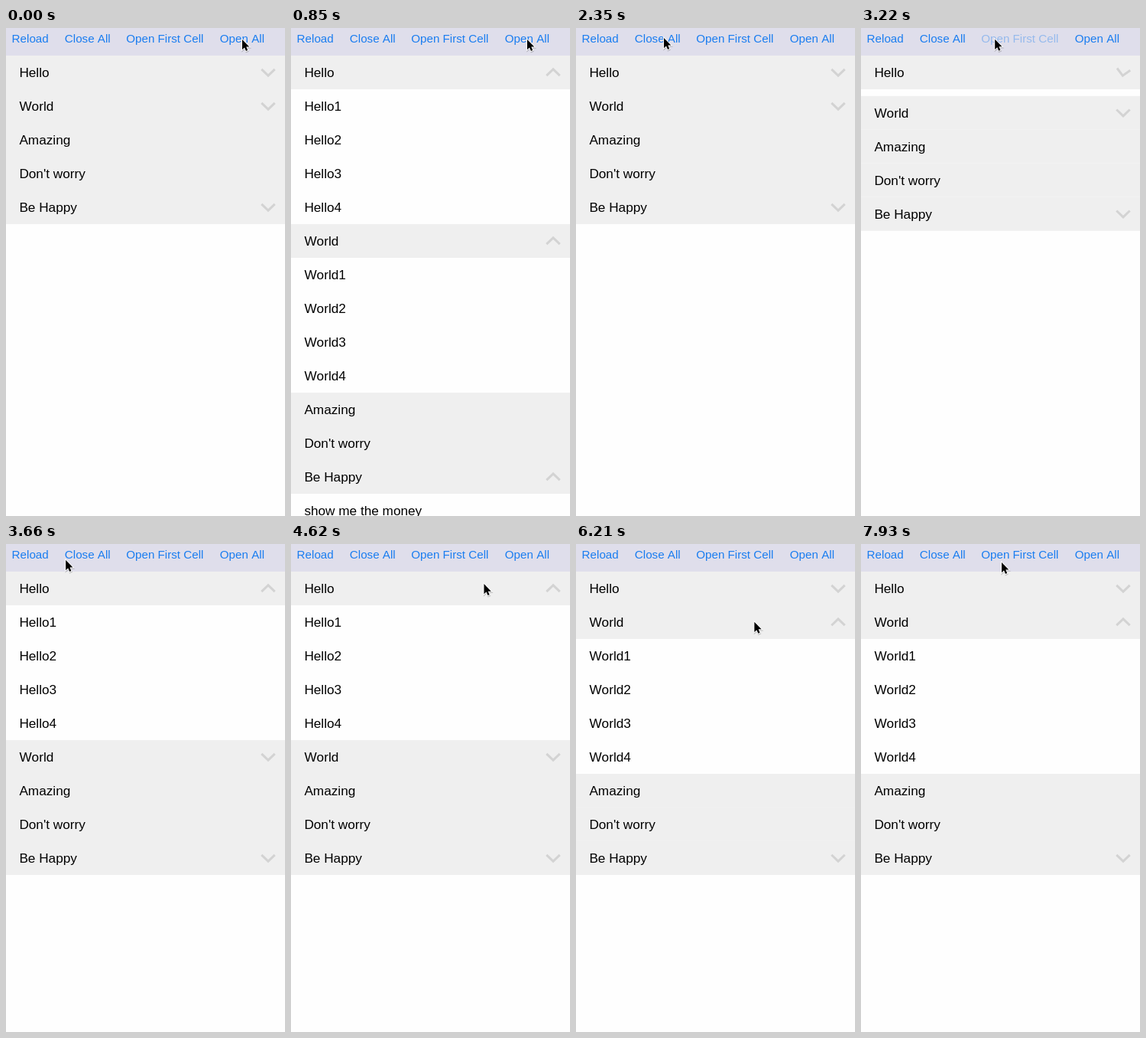
An HTML page that plays this animation: 365x637 px, repeating every 8 s.

```html
<!DOCTYPE html>
<html lang="en">
<head>
<meta charset="utf-8">
<title>Collapsible table</title>
<style>
  html, body { margin: 0; width: 100%; height: 100%; overflow: hidden; background: #fefefe; }
  svg { display: block; width: 365px; height: 637px; font: 17.2px "Liberation Sans", Arial, sans-serif; font-kerning: none; }
  .bar { font-size: 15.2px; fill: #1a7df0; }
</style>
</head>
<body>
<svg id="stage" viewBox="0 0 365 637"></svg>
<script>
const LOOP = 8000, FIRST = 500, STEP = 87.8;
const ROW = 44, TOP = 36;
const OPEN_TIME = 310, HOLD_TIME = 140, FADE_TIME = 260, TRAVEL_TIME = 520;

const numbered = word => [1, 2, 3, 4].map(n => word + n);
const sections = [
  { title: 'Hello', rows: numbered('Hello') },
  { title: 'World', rows: numbered('World') },
  { title: 'Amazing', rows: [] },
  { title: "Don't worry", rows: [] },
  { title: 'Be Happy', rows: ['show me the money'] },
];

const buttons = [
  { title: 'Reload', x: 7.6 },
  { title: 'Close All', x: 76.8 },
  { title: 'Open First Cell', x: 157.2 },
  { title: 'Open All', x: 279.8 },
];

// Each click leaves exactly the listed sections open.
const clicks = [
  { at: 460, button: 'Open All', open: ['Hello', 'World', 'Be Happy'] },
  { at: 2030, button: 'Close All', open: [] },
  { at: 3180, button: 'Open First Cell', open: ['Hello'] },
  { at: 4840, open: [] },
  { at: 5900, open: ['World'] },
  { at: 6900, button: 'Reload', open: ['World'] },
];

const pointerStops = [
  { at: 0, x: 309, y: 15 },
  { at: 1960, x: 115, y: 13 },
  { at: 3050, x: 186, y: 14 },
  { at: 3640, x: 78, y: 21 },
  { at: 4090, x: 104, y: 19 },
  { at: 4700, x: 261, y: 54 },
  { at: 5130, x: 286, y: 108 },
  { at: 5660, x: 234, y: 102 },
  { at: 6710, x: 30, y: 13 },
  { at: 7860, x: 184, y: 24 },
];

const stage = document.getElementById('stage');
const clamp = v => Math.max(0, Math.min(1, v));
const ease = v => v * v * (3 - 2 * v);
const mix = (a, b, k) => a + (b - a) * k;

function add(parent, tag, attrs, text) {
  const node = document.createElementNS('http://www.w3.org/2000/svg', tag);
  for (const key in attrs) node.setAttribute(key, attrs[key]);
  if (text) node.textContent = text;
  parent.append(node);
  return node;
}

function addCell(parent, title, fill) {
  const cell = add(parent, 'g', {});
  add(cell, 'rect', { width: 365, height: ROW, fill });
  add(cell, 'text', { x: 17.4, y: 28 }, title);
  return cell;
}

function place(node, x, y) {
  node.setAttribute('transform', `translate(${x} ${y})`);
}

const rowLayer = add(stage, 'g', {});
const headerLayer = add(stage, 'g', {});
for (const s of sections) {
  s.cells = s.rows.map(title => addCell(rowLayer, title, '#fefefe'));
  s.header = addCell(headerLayer, s.title, '#efefef');
  if (s.rows.length) {
    s.chevron = add(s.header, 'path', {
      d: 'M334.3 17.8 L343 26.2 L351.7 17.8', fill: 'none', stroke: '#d3d3d3', 'stroke-width': 3,
    });
  }
}

add(stage, 'rect', { width: 365, height: TOP, fill: '#dfdeeb' });
for (const b of buttons) b.label = add(stage, 'text', { class: 'bar', x: b.x, y: 19.2 }, b.title);

const arrow = 'M0 0 V13.2 L3 10.5 L5 15 L7.2 14.1 L5.3 9.6 H9.3 Z';
const pointer = add(stage, 'g', {});
add(pointer, 'path', { d: arrow, transform: 'translate(.4 1.2)', stroke: '#000', 'stroke-width': 2, opacity: 0.18 });
add(pointer, 'path', { d: arrow, stroke: '#fff', 'stroke-width': 1.8, 'paint-order': 'stroke' });

function openness(title, t) {
  return clicks.reduce((value, { at, open }) =>
    mix(value, open.includes(title) ? 1 : 0, ease(clamp((t - at) / OPEN_TIME))), 0);
}

function labelOpacity(title, t) {
  const { at } = clicks.find(click => click.button === title);
  return t < at - HOLD_TIME ? 1 : mix(0.25, 1, clamp((t - at) / FADE_TIME));
}

function pointerAt(t) {
  let { x, y } = pointerStops[0];
  pointerStops.slice(1).forEach((stop, i) => {
    const start = Math.max(pointerStops[i].at, stop.at - TRAVEL_TIME);
    const k = ease(clamp((t - start) / (stop.at - start)));
    x = mix(x, stop.x, k);
    y = mix(y, stop.y, k);
  });
  return [x, y];
}

function draw(time) {
  // The picture advances in even steps, like a screen recording.
  const t = time < FIRST - 6 ? 0 : FIRST + Math.floor((time - FIRST + 6) / STEP) * STEP;
  let y = TOP;
  for (const s of sections) {
    const open = openness(s.title, t);
    place(s.header, 0, y);
    if (s.chevron) s.chevron.setAttribute('transform', `rotate(${180 * open} 343 22)`);
    s.cells.forEach((cell, i) => {
      place(cell, 0, y + ROW * (i + 1));
      cell.setAttribute('opacity', open);
    });
    y += ROW * (1 + s.rows.length * open);
  }
  for (const b of buttons) b.label.setAttribute('opacity', labelOpacity(b.title, t));
  place(pointer, ...pointerAt(t));
}

const begin = performance.now();
function tick() {
  draw((performance.now() - begin) % LOOP);
  requestAnimationFrame(tick);
}
tick();
</script>
</body>
</html>
```
